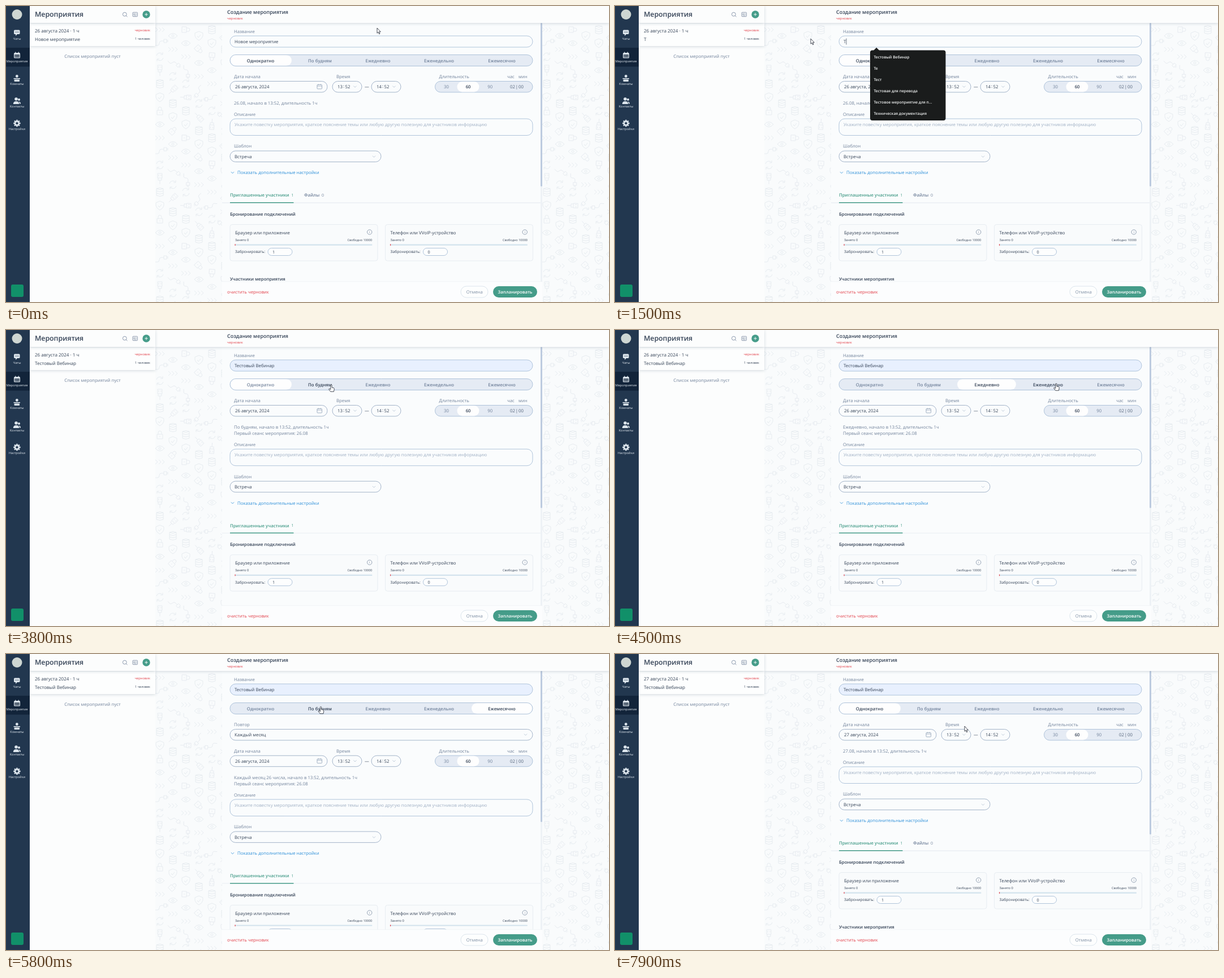
Recreate the animation shown at these times as an HTML page with a canvas. Size 1066 by 525 pixels, loop 8000 ms.

```html
<!DOCTYPE html>
<html lang="ru">
<head>
<meta charset="utf-8">
<title>Создание мероприятия</title>
<style>
  html, body { margin: 0; width: 100%; height: 100%; overflow: hidden; background: #fafbfc; }
  canvas { display: block; }
</style>
</head>
<body>
<canvas id="stage" width="1066" height="525"></canvas>
<script>
const ctx = document.getElementById('stage').getContext('2d');
const INK = '#344256', LABEL = '#71829b', LINE = '#9db6d2', GREEN = '#459c89', RED = '#e2404a', PANEL = '#fafcfd';
const LOOP = 8000, STEP = 100;

const TYPED = [[0, 'Новое мероприятие'], [1500, 'Т'], [1700, 'Те'], [2000, 'Тес'], [2100, 'Тест'],
  [2300, 'Тесто'], [3300, 'Тестовый Вебинар']];
const HINTS = ['Тестовый Вебинар', 'Те', 'Тест', 'Тестовая для перевода', 'Тестовое мероприятие для п...',
  'Техническая документация'];
const MODES = [[0, 0], [3700, 1], [4200, 2], [4700, 3], [5300, 4], [6000, 0]];
const TABS = ['Однократно', 'По будням', 'Ежедневно', 'Еженедельно', 'Ежемесячно'];
const TAB_EDGES = [397, 505, 605, 709, 823, 930];
const REPEATS = ['', 'По будням', 'Ежедневно', 'Каждую неделю в следующие дни: пн', 'Каждый месяц 26 числа'];
const WEEK = ['ПН', 'ВТ', 'СР', 'ЧТ', 'ПТ', 'СБ', 'ВС'];

const CURSOR = [
  [0, 656, 39, 'arrow'], [100, 642, 42, 'arrow'], [300, 520, 57, 'beam'], [400, 488, 58, 'beam'],
  [800, 346, 58, 'arrow'], [2800, 346, 58, 'arrow'], [3100, 500, 88, 'arrow'], [3300, 500, 88, 'arrow'],
  [3600, 575, 97, 'hand'], [3900, 575, 97, 'hand'], [4100, 655, 96, 'hand'], [4300, 655, 96, 'hand'],
  [4500, 780, 95, 'hand'], [4800, 785, 94, 'hand'], [5100, 862, 92, 'hand'], [5200, 876, 92, 'hand'],
  [5500, 876, 92, 'hand'], [5900, 450, 94, 'hand'], [6100, 450, 94, 'hand'], [6400, 553, 142, 'hand'],
  [6700, 553, 142, 'hand'], [7300, 439, 308, 'hand'], [7500, 439, 308, 'hand'], [7900, 618, 128, 'arrow']];

const POINTERS = {
  arrow: 'M0 0V9.2L2.1 7.3 3.6 10.7 5 10.1 3.6 6.8H6.3Z',
  hand: 'M-1.1 1a1.1 1.1 0 0 1 2.2 0V5L4.3 5.7Q5.6 6.2 5.3 7.6L4.5 12.3H-1.3L-4 8.6Q-4.6 7.2 -3.2 7.2L-1.1 8.5Z',
  beam: 'M-2 0H2M0 0V10M-2 10H2'
};
const DOODLES = [
  'M-8-4l4 4-4 4M-2-4l4 4-4 4M4-4l4 4-4 4',
  'M0-8l7 3v5q-1 5-7 8-6-3-7-8v-5zM-3 0l2 3 4-5',
  'M-6-2a6 6 0 0 1 11-2M6 2a6 6 0 0 1-11 2M5-8v4h-4M-5 8v-4h4',
  'M-8 0q8-9 16 0-8 9-16 0M-2 0a2 2 0 1 0 4 0 2 2 0 1 0-4 0',
  'M-6-6q6-3 12 0v12q-6 3-12 0zM-6-6q6 3 12 0M-6-2q6 3 12 0M-6 2q6 3 12 0',
  'M-9 4h5q3 0 3-4t4-4h4M7-7h5v6h-5zM12-5h3M12-3h3',
  'M-5-1h10v8h-10zM-3-1v-3a3 3 0 0 1 6 0v3M0 2v2',
  'M-4-9h8v8h-8zM-3-1v4h6v-4M0 3v7M-2-7v3M2-7v3'
];

const lastOf = (list, t) => list.findLast(item => item[0] <= t);
const mix = (a, b, k) => a + (b - a) * k;

function text(s, x, y, color = INK, size = 7.8, weight = 400, align = 'left') {
  ctx.font = `${weight} ${size}px "Open Sans", "Noto Sans", sans-serif`;
  ctx.textAlign = align;
  ctx.fillStyle = color;
  ctx.fillText(s, x, y + size * .36);
}

function box(x0, y0, x1, y1, r, fill, stroke, width = .8) {
  ctx.beginPath();
  ctx.roundRect(x0, y0, x1 - x0, y1 - y0, r);
  if (fill) { ctx.fillStyle = fill; ctx.fill(); }
  if (stroke) { ctx.strokeStyle = stroke; ctx.lineWidth = width; ctx.stroke(); }
}

function path(d, x, y, fill, stroke, width = .8, turn = 0) {
  const shape = new Path2D(d);
  ctx.save();
  ctx.translate(x, y);
  ctx.rotate(turn);
  if (fill) { ctx.fillStyle = fill; ctx.fill(shape); }
  if (stroke) { ctx.strokeStyle = stroke; ctx.lineWidth = width; ctx.stroke(shape); }
  ctx.restore();
}

const dot = (x, y, r, fill, stroke) => box(x - r, y - r, x + r, y + r, r, fill, stroke);
const chevron = (x, y, color = '#b3c0d1') => path('M-2.6-1.3L0 1.3 2.6-1.3', x, y, null, color);

function shaded(x0, y0, x1, y1, fill) {
  ctx.save();
  ctx.shadowColor = 'rgba(60,85,110,.22)';
  ctx.shadowBlur = 5;
  ctx.shadowOffsetY = 1;
  box(x0, y0, x1, y1, 0, fill);
  ctx.restore();
}

function clipped(x, y, w, h, draw) {
  ctx.save();
  ctx.beginPath();
  ctx.rect(x, y, w, h);
  ctx.clip();
  draw();
  ctx.restore();
}

function backdrop() {
  box(0, 0, 1066, 525, 0, '#f9fbfc');
  for (const left of [264, 948])
    clipped(left, 30, 118, 495, () => {
      for (let col = 0; col < 6; col++)
        for (let row = 0; row < 21; row++) {
          const kind = (col * 3 + row * 5) % DOODLES.length;
          path(DOODLES[kind], left + 8 + col * 23, 42 + row * 24 + (col % 2) * 11, null, '#e5eaef', .9, kind > 4 ? col * .8 : 0);
        }
    });
}

function sidebar() {
  box(0, 0, 42, 525, 0, '#22374f');
  box(0, 74, 42, 107.5, 0, '#12243a');
  dot(19.5, 15, 9, '#ced6d2');
  ['Чаты', 'Мероприятия', 'Комнаты', 'Контакты', 'Настройки'].forEach((s, i) =>
    text(s, 19.5, 58 + i * 39.9, '#e6edf3', 5.55, 400, 'center'));
  const W = '#dce5ec', B = '#22374f';
  box(14, 42.5, 24.5, 50, 1.5, W);
  path('M17 49v4l4-4z', 0, 0, W);
  for (const x of [17, 19.3, 21.6]) dot(x, 46.3, .7, B);
  box(14, 83, 25, 92.5, 1.5, W);
  path('M16.8 81.5v3M22.2 81.5v3', 0, 0, null, W, 1.3);
  box(15.3, 86, 23.7, 91.3, 0, '#12243a');
  for (let i = 0; i < 6; i++) box(16 + i % 3 * 2.6, 86.7 + (i > 2) * 2.3, 17.6 + i % 3 * 2.6, 88.1 + (i > 2) * 2.3, 0, W);
  dot(19.3, 124.5, 2.4, W);
  box(13.5, 128, 25, 129.6, 0, W);
  box(14.5, 130.5, 24, 134, 1, W);
  dot(18, 165, 2.8, W);
  path('M12.8 174q0-5 5.2-5t5.2 5z', 0, 0, W);
  dot(23, 166, 2, W);
  path('M22 169.5q4 0 4 4h-2q0-3-2-4z', 0, 0, W);
  for (let i = 0; i < 4; i++) path('M0-6.2V6.2', 19.4, 208, null, W, 2.6, i * Math.PI / 4);
  dot(19.4, 208, 4.5, W);
  dot(19.4, 208, 2.1, B);
  box(9, 494, 31, 516, 3, '#119069');
}

function eventList(title, day) {
  box(42, 0, 264, 525, 0, '#fcfdfd');
  shaded(42, 31, 264, 71, '#fdfefe');
  shaded(42, 0, 264, 30, '#fcfdfd');
  text('Мероприятия', 51, 15, INK, 12.3, 600);
  dot(209.8, 14.7, 3.4, null, LABEL);
  path('M212.3 17.2l2.2 2.2', 0, 0, null, LABEL);
  box(224, 11.3, 232.5, 18.7, 1, null, LABEL);
  path('M225.8 13.5h2v2h-2zM229 13.6h2M229 15.2h2M225.8 17h5.2', 0, 0, null, LABEL, .6);
  dot(248, 15, 6.7, GREEN);
  path('M245.3 15h5.4M248 12.3v5.4', 0, 0, null, '#fff', .9);
  text(`${day} августа 2024 · 1 ч`, 51, 44, INK, 8.05);
  text(title, 51, 59.5, INK, 8.05);
  text('черновик', 255, 43, RED, 5.8, 400, 'right');
  text('1 человек', 255, 57.5, INK, 5.6, 400, 'right');
  text('Список мероприятий пуст', 153, 89, LABEL, 7.8, 400, 'center');
}

function titleField(t, title, typedAt, cursorX) {
  text('Название', 403, 45, LABEL);
  box(396, 53, 931, 73, 10, t >= 3300 ? '#e8f0fe' : PANEL, LINE);
  text(title, 404, 63);
  const end = 404 + ctx.measureText(title).width;
  if (t >= 400 && t < 1500) {
    const from = Math.max(404, cursorX);
    clipped(from, 57, Math.max(0, end - from), 12, () => {
      box(404, 57, end, 69, 0, '#2b7cd9');
      text(title, 404, 63, '#fff');
    });
  }
  if (t >= 1500 && t < 3300 && (t - typedAt) % 1000 < 500) box(end + .3, 57.5, end + 1, 68.5, 0, INK);
}

function tabBar(t, mode, changedAt, previous, cursor) {
  box(396, 86.5, 931, 106.5, 10, '#e5ebf4', LINE);
  const raw = Math.min(1, Math.max(0, (t - changedAt - 100) / 200));
  const k = changedAt ? raw * raw * (3 - 2 * raw) : 1;
  const edge = side => mix(TAB_EDGES[previous + side], TAB_EDGES[mode + side], k);
  box(edge(0), 87, edge(1), 106, 9.5, '#fefefe');
  TABS.forEach((s, i) => {
    const hover = cursor.y > 84 && cursor.y < 107 && cursor.x > TAB_EDGES[i] && cursor.x < TAB_EDGES[i + 1] && t > 3300;
    text(s, [450, 555, 657.5, 765.5, 876.5][i], 97, i === mode || hover ? INK : LABEL, 7.8, 600, 'center');
  });
}

function repeatRow(mode) {
  text('Повтор', 403, 125, LABEL);
  const weekly = mode === 3, right = weekly ? 728.5 : 931;
  box(396, 133.5, right, 153, 10, PANEL, '#8fa3bd');
  text(weekly ? 'Каждую неделю' : 'Каждый месяц', 404, 143);
  chevron(right - 12.5, 143);
  if (weekly) WEEK.forEach((s, i) => {
    const x = 747.5 + i * 28.9;
    dot(x, 143, 10, i ? '#a5c0dc' : '#0d98ea');
    text(s, x, 143, i > 4 ? '#d7566b' : i ? '#466284' : '#fff', 7.3, 600, 'center');
  });
}

function dateRow(day) {
  text('Дата начала', 403, 125, LABEL);
  text('Время', 584, 125, LABEL);
  text('Длительность', 765.5, 125, LABEL);
  text('час', 886, 125, LABEL);
  text('мин', 906, 125, LABEL);
  box(396, 133.5, 568, 153, 10, PANEL, '#8fa3bd');
  text(`${day} августа, 2024`, 405, 143);
  box(550, 139.5, 558.5, 147, 1, null, '#8c9db3');
  path('M550 142h8.5M552.3 138.5v2M556.2 138.5v2', 0, 0, null, '#8c9db3', .7);
  for (const [x, hour] of [[577, '13'], [646, '14']]) {
    box(x, 133.5, x + 52, 153, 10, PANEL, '#8fa3bd');
    text(hour, x + 9, 143);
    text(':', x + 20, 142.5, INK, 7.8, 400, 'center');
    text('52', x + 22.5, 143);
    chevron(x + 40, 143);
  }
  text('—', 638, 143, INK, 7.8, 400, 'center');
  box(758.5, 133.5, 931, 153, 10, '#e5ebf4', LINE);
  box(797.5, 134, 836.5, 152.5, 9, '#fefefe');
  [30, 60, 90].forEach((n, i) => text(n, 778.5 + i * 38.6, 143, i === 1 ? INK : LABEL, 7.8, i === 1 ? 600 : 400, 'center'));
  text('02', 891, 143, '#536379');
  text('|', 903, 143, '#536379', 7.8, 400, 'center');
  text('00', 906, 143, '#536379');
}

function connectionCard(x, title, count) {
  box(x, 387.5, x + 261, 452, 4, '#f9fbfc', '#e3e9ef');
  text(title, x + 9, 402);
  dot(x + 246.7, 401, 4.2, null, '#7d8da3');
  text('i', x + 246.7, 401, '#7d8da3', 6, 400, 'center');
  text('Занято 0', x + 9, 415, INK, 5.75);
  text('Свободно 10000', x + 251.5, 415, INK, 5.55, 400, 'right');
  box(x + 9, 422.5, x + 251.5, 424.7, 1, '#d3e3ed');
  box(x + 8.5, 422.3, x + 9.7, 425, 0, RED);
  text('Забронировать:', x + 9, 436, INK, 6.75);
  box(x + 67, 429.5, x + 110, 442.5, 6.5, '#fdfefe', LINE);
  text(count, x + 75, 436, INK, 7.2);
}

function lowerForm(once) {
  text('Описание', 403, 192, LABEL);
  box(396, 200, 931, 229.5, 10, PANEL, LINE);
  text('Укажите повестку мероприятия, краткое пояснение темы или любую другую полезную для участников информацию',
    404, 210, '#9fafc4');
  text('Шаблон', 403, 248.5, LABEL);
  box(396, 257, 663, 276.5, 10, PANEL, '#8fa3bd');
  text('Встреча', 404, 267);
  chevron(650.5, 267);
  chevron(400.5, 295.5, '#2b8ed8');
  text('Показать дополнительные настройки', 409, 295.5, '#2b8ed8');
  box(382, 348.6, 945, 349.4, 0, '#e3eaef');
  text('Приглашенные участники', 396, 335.5, GREEN, 7.8, 600);
  text('1', 504.5, 335.5, GREEN, 7);
  box(396, 348, 508.5, 349.6, 0, GREEN);
  if (once) {
    text('Файлы', 527, 335.5, LABEL, 7.8, 600);
    text('0', 558, 335.5, LABEL, 7);
  }
  text('Бронирование подключений', 396, 369, INK, 7.8, 600);
  connectionCard(396, 'Браузер или приложение', '1');
  connectionCard(670.5, 'Телефон или VVoIP-устройство', '0');
  text('Участники мероприятия', 396, 484.5, INK, 7.8, 600);
}

function frameBars() {
  box(382, 489, 948, 525, 0, '#fcfdfe');
  box(382, 488.5, 948, 489.2, 0, '#edf1f4');
  text('очистить черновик', 391, 507.5, RED);
  box(804, 497, 852, 517, 10, '#fdfefe', '#d3dfe8');
  text('Отмена', 828.3, 507, '#7c8ca2', 7.8, 400, 'center');
  box(861, 497, 939, 517, 10, GREEN);
  text('Запланировать', 900, 507, '#fff', 7.75, 600, 'center');
  shaded(264, 0, 1066, 30, '#fcfdfd');
  text('Создание мероприятия', 391, 11, INK, 9, 600);
  text('черновик', 391, 22, RED, 5.85);
}

function suggestions(title) {
  const items = HINTS.filter(s => s.startsWith(title));
  box(451, 78.5, 584.5, 83 + items.length * 20, 4, '#1a1c1c');
  path('M457 79l5.2-5.2 5.2 5.2z', 0, 0, '#1a1c1c');
  items.forEach((s, i) => text(s, 457.5, 91 + i * 20, '#f4f6f6', 6.7, 600));
}

function calendar(cursor) {
  shaded(394, 157, 591, 345, '#fdfefe');
  text('август 2024', 492.5, 171, INK, 7.8, 600, 'center');
  path('M410 168.5l-2.6 2.6 2.6 2.6M575 168.5l2.6 2.6-2.6 2.6', 0, 0, null, LABEL);
  WEEK.forEach((s, i) => text(s, 412 + i * 27, 191, LABEL, 6.5, 400, 'center'));
  for (let d = 1; d <= 31; d++) {
    const cell = d + 2, x = 412 + cell % 7 * 27, y = 212 + Math.floor(cell / 7) * 25;
    const hover = Math.hypot(cursor.x - x, cursor.y - y) < 11;
    if (d === 26 || hover) dot(x, y, 9.5, d === 26 ? '#0d98ea' : '#e0e9f4');
    text(d, x, y, d === 26 ? '#fff' : d < 26 ? '#a9b6c7' : INK, 7.5, 400, 'center');
  }
}

function cursorAt(t) {
  const i = CURSOR.findLastIndex(key => key[0] <= t), a = CURSOR[i], b = CURSOR[i + 1] || a;
  const k = a === b ? 0 : (t - a[0]) / (b[0] - a[0]);
  return { x: mix(a[1], b[1], k), y: mix(a[2], b[2], k), kind: a[3] };
}

function draw(t) {
  const [typedAt, title] = lastOf(TYPED, t), [changedAt, mode] = lastOf(MODES, t);
  const previous = (lastOf(MODES, changedAt - 1) || MODES[0])[1];
  const day = t < 7600 ? 26 : 27, cursor = cursorAt(t);
  const repeatShift = mode > 2 ? 46.7 : 0, shift = repeatShift + (mode ? 11.2 : 0);

  ctx.textRendering = 'geometricPrecision';
  backdrop();
  box(382, 30, 948, 525, 0, PANEL);
  clipped(382, 30, 566, 459, () => {
    titleField(t, title, typedAt, cursor.x);
    tabBar(t, mode, changedAt, previous, cursor);
    if (repeatShift) repeatRow(mode);
    ctx.translate(0, repeatShift);
    dateRow(day);
    text(`${REPEATS[mode] || day + '.08'}, начало в 13:52, длительность 1ч`, 403, 172, LABEL);
    if (mode) text('Первый сеанс мероприятия: 26.08', 403, 183.3, LABEL);
    ctx.translate(0, shift - repeatShift);
    lowerForm(!mode);
  });
  box(945, 30, 948, 489, 0, '#eef2f6');
  box(945, 30, 948, 320 - shift * .38, 1.5, '#bdcbdf');
  frameBars();
  eventList(title, day);
  sidebar();
  if (t >= 1500 && t < 3300) suggestions(title);
  if (t >= 6600 && t < 7600) calendar(cursor);
  path(POINTERS[cursor.kind], cursor.x, cursor.y, cursor.kind === 'beam' ? null : '#fff', '#1d2430', .8);
}

let shown = -1;
function tick() {
  const t = Math.floor(performance.now() % LOOP / STEP) * STEP;
  if (t !== shown) draw(shown = t);
  requestAnimationFrame(tick);
}
tick();
</script>
</body>
</html>
```
